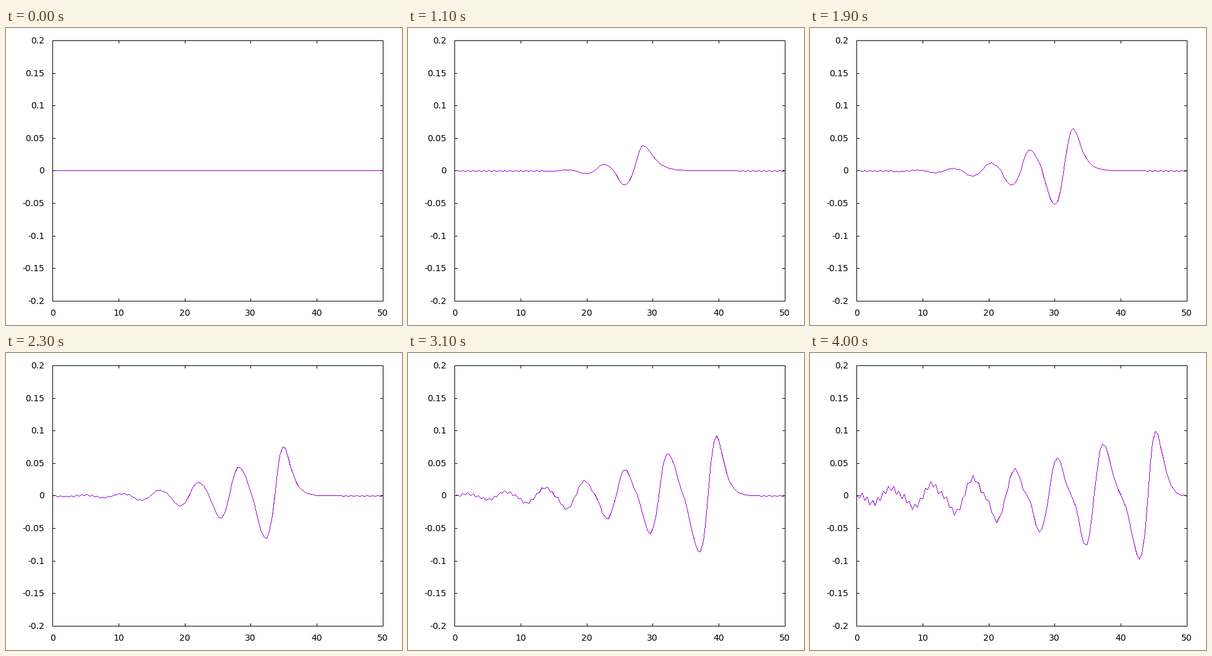
Recreate the animation shown at these times as a matplotlib script. Size 640 by 480 pixels, loop 4100 ms.

```python
import numpy as np
import matplotlib.pyplot as plt
from matplotlib.animation import FuncAnimation
from matplotlib.collections import LineCollection

W, H, DPI = 640, 480, 100
LEFT, RIGHT, TOP, BOTTOM = 75, 609, 20, 441
FRAMES, INTERVAL = 41, 100
PX = 72 / DPI

grid = np.arange(126)
xs = grid * 0.4
columns = np.arange(LEFT, RIGHT + 1)


def col(x):
    return np.floor(LEFT + x / 50 * (RIGHT - LEFT) + .5)


def row(y):
    up = np.floor((y + .2) / .4 * (BOTTOM - TOP) + .5 + 1e-9)
    return BOTTOM - up


def extrema(t):
    """Places and heights of alternating crests and troughs, front first."""
    m = np.arange(8)
    lead = 23.3 + 4.45 * t + .26 * t**2
    crest = lead - (4.95 + .31 * t) * m - (.3 + .65 * t) * (1 - np.exp(-m))
    trough = crest - 2.9 + .13 * t * np.exp(-m / 2.5)
    pos = np.column_stack([crest, trough]).ravel()

    n = np.arange(16.0)
    n[1::2] -= .25 * t - .3
    decay = .72 / max(t, .1) - .085
    top = .1 * np.sin(np.pi / 2 * (t / 4) ** 1.07)
    return pos, top * np.exp(-decay * n**1.25)


def ripple(t, k):
    """Growing point-to-point wobble that flips sign at every step."""
    reach = 22 + 24 * np.exp(-((t - 3.5) / .2) ** 2)
    spread = 1 / (1 + np.exp((xs - reach) / 3)) + .2 / (1 + np.exp(46 - xs))
    return 9e-5 * np.exp(.97 * t) * spread * (-1.0) ** (grid + k)


def wave(k):
    u = np.zeros_like(xs)
    if k == 0:
        return u
    t = k * INTERVAL / 1000
    pos, amp = extrema(t)

    # Front slope of the packet, flattened at the right wall
    ahead = xs >= pos[0]
    steep = min(.5 + .22 * t, 1.04)
    wall = np.clip((50 - xs) / 2.5, 0, 1)
    u[ahead] = (amp[0] * wall / np.cosh(steep * (xs - pos[0])))[ahead]

    # Half waves between neighbours; falling ones are skewed
    skew = np.clip(.14 * (t - 1.9), 0, .3)
    for n in range(len(pos) - 1):
        right, left = pos[n], pos[n + 1]
        part = (xs >= left) & (xs < right)
        s = (xs[part] - left) / (right - left)
        g = np.cos(np.pi * s)
        if n % 2:
            g -= skew * np.sin(2 * np.pi * s) * np.sin(np.pi * s)
        sign = 1 if n % 2 else -1
        u[part] = sign * g * np.where(g > 0, amp[n + 1], amp[n])

    u += ripple(t, k)
    u[0] = 0
    return u


def spans(k):
    """One vertical run per pixel column, so the line is crisp and 1 px thin."""
    px, py = col(xs), row(wave(k))
    y = np.array([np.interp(columns + d, px, py) for d in (-.5, 0, .5)])
    mid = np.floor(y[1] + .5)
    lo = np.minimum(mid, np.ceil(y.min(axis=0)))
    hi = np.maximum(mid, np.floor(y.max(axis=0)))
    c = columns + .5
    return np.stack([np.column_stack([c, lo]),
                     np.column_stack([c, hi + 1])], axis=1)


fig = plt.figure(figsize=(W / DPI, H / DPI), dpi=DPI, facecolor="white")
ax = fig.add_axes([0, 0, 1, 1])
ax.set_xlim(0, W)
ax.set_ylim(H, 0)
ax.axis("off")


def stroke(x, y):
    ax.plot(np.asarray(x) + .5, np.asarray(y) + .5, color="black", lw=PX,
            snap=False, zorder=3, solid_capstyle="projecting",
            solid_joinstyle="miter")


def label(x, y, text, align):
    ax.text(x, y, text, ha=align, va="baseline", color="black",
            family="DejaVu Sans", fontsize=14 * PX)


stroke([LEFT, RIGHT, RIGHT, LEFT, LEFT], [TOP, TOP, BOTTOM, BOTTOM, TOP])
for v in range(0, 51, 10):
    c = col(v)
    stroke([c, c], [BOTTOM, BOTTOM - 4])
    stroke([c, c], [TOP, TOP + 4])
    label(c, 465, str(v), "center")
for i in range(-4, 5):
    r = row(i * .05)
    stroke([LEFT, LEFT + 4], [r, r])
    stroke([RIGHT, RIGHT - 4], [r, r])
    label(62, r + 5, f"{i * .05:g}", "right")

curve = LineCollection(spans(0), colors="#9400d3", linewidths=PX,
                       capstyle="butt", snap=False, zorder=2)
ax.add_collection(curve, autolim=False)


def draw(k):
    curve.set_segments(spans(k))
    return [curve]


anim = FuncAnimation(fig, draw, frames=FRAMES, interval=INTERVAL,
                     repeat=True, repeat_delay=0)
plt.show()
```
